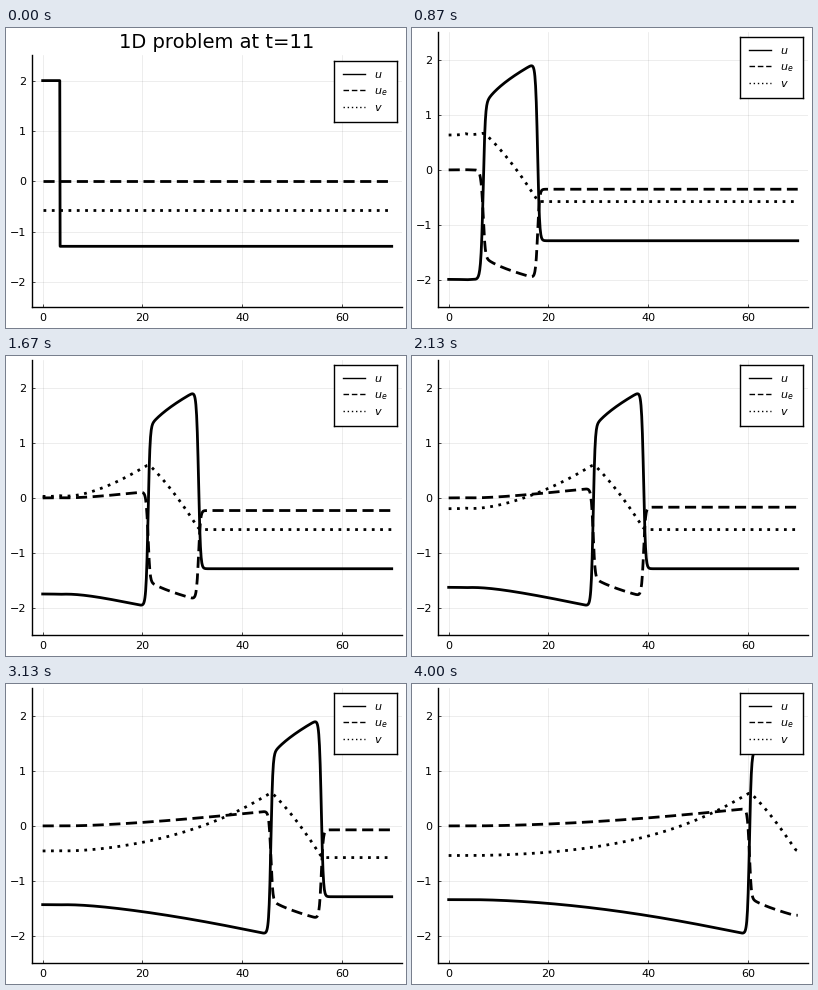
These frames come from a looping animation (400 px wide and 300 px high, 4.07 s). A matplotlib script:

```python
import numpy as np
import matplotlib.pyplot as plt
from matplotlib.animation import FuncAnimation

W, H, DPI = 400, 300, 100
PX = 72 / DPI  # points per pixel
TICK_MS, LOOP_MS = 10, 4070
FPS = 15
STATES = 61

# FitzHugh-Nagumo bidomain model, implicit Euler
LENGTH, CELLS = 70, 1000
DT, STEPS = 0.1, 5
EPS, GAMMA, BETA = 0.1, 0.5, 1.0
DIFF = 0.5
U_REST, V_REST = -1.28791, -0.5758

x = np.linspace(0, LENGTH, CELLS + 1)


def solve_tridiag(lower, diag, upper, rhs):
    lower, diag, upper, rhs = (a.tolist() for a in (lower, diag, upper, rhs))
    n = len(rhs)
    for i in range(1, n):
        w = lower[i] / diag[i - 1]
        diag[i] -= w * upper[i - 1]
        rhs[i] -= w * rhs[i - 1]
    rhs[-1] /= diag[-1]
    for i in range(n - 2, -1, -1):
        rhs[i] = (rhs[i] - upper[i] * rhs[i + 1]) / diag[i]
    return np.array(rhs)


def step(u0, v0):
    k = DT * DIFF / (x[1] - x[0]) ** 2
    lower = np.full(x.size, -k)
    upper = lower.copy()
    lower[-1] = upper[0] = -2 * k  # no flux at both ends
    decay = 1 + DT * EPS * GAMMA
    dv = DT * EPS / decay
    u = u0.copy()
    for _ in range(12):
        v = (v0 + DT * EPS * (u + BETA)) / decay
        res = u - u0 - DT / EPS * (u - u**3 / 3 - v) + 2 * k * u
        res[1:] += lower[1:] * u[:-1]
        res[:-1] += upper[:-1] * u[1:]
        diag = 1 + 2 * k - DT / EPS * (1 - u**2 - dv)
        delta = solve_tridiag(lower, diag, upper, res)
        u = u - delta
        if np.abs(delta).max() < 1e-4:
            break
    return u, (v0 + DT * EPS * (u + BETA)) / decay


def simulate():
    u = np.where(x <= LENGTH / 20, 2.0, U_REST)
    v = np.full(x.size, V_REST)
    states = [(u, np.zeros(x.size), v)]
    for _ in range(STATES - 1):
        for _ in range(STEPS):
            u, v = step(u, v)
        states.append((u, (u[0] - u) / 2, v))
    return states


def box(left, top, right, bottom):
    return [left / W, 1 - bottom / H, (right - left) / W, (bottom - top) / H]


def plot_box(top):
    return box(26.2, top + 0.4, 396.2, 279.4)


def key_box(top):
    return box(328, top, 391, top + 61)


states = simulate()
styles = ["-", (0, (4, 2)), (0, (1, 2))]
names = ["$u$", "$u_e$", "$v$"]

plt.rcParams.update({"font.family": "DejaVu Sans", "font.size": 8,
                     "mathtext.fontset": "dejavusans"})
fig = plt.figure(figsize=(W / DPI, H / DPI), dpi=DPI, facecolor="white")

ax = fig.add_axes(plot_box(4))
ax.set(xlim=(-2.1, 72.1), ylim=(-2.5, 2.5),
       xticks=range(0, 61, 20), yticks=range(-2, 3))
ax.spines[["top", "right"]].set_visible(False)
ax.spines[["left", "bottom"]].set_linewidth(1)
ax.tick_params(direction="in", length=3 * PX, width=0.5, pad=6 * PX)
ax.grid(color="black", alpha=0.1, linewidth=0.5)
ax.set_axisbelow(True)
curves = [ax.plot([], [], color="black", lw=2, ls=s, dash_capstyle="butt")[0]
          for s in styles]

title = fig.text(211 / W, 1 - 20 / H, "", fontsize=14, ha="center")

key = fig.add_axes(key_box(9))
key.set(xlim=(0, 63), ylim=(61, 0), xticks=[], yticks=[])
for spine in key.spines.values():
    spine.set_linewidth(1)
for row, (style, name) in enumerate(zip(styles, names)):
    y = 13 + 16.4 * row
    key.plot([9, 31.5], [y, y], color="black", lw=1, ls=style,
             dash_capstyle="butt")
    key.text(40, y + 4.2, name)


def draw(tick):
    # states change at 15 fps, rounded to whole ticks
    i = int((tick + 0.5) * TICK_MS * FPS / 1000)
    ax.set_position(plot_box(4 if i else 27))
    key.set_position(key_box(9 if i else 33))
    title.set_text("" if i else "1D problem at t=11")
    for curve, values in zip(curves, states[i]):
        curve.set_data(x, values)
    return [*curves, title]


anim = FuncAnimation(fig, draw, frames=LOOP_MS // TICK_MS, interval=TICK_MS,
                     repeat=True, repeat_delay=0, blit=False)
plt.show()
```
